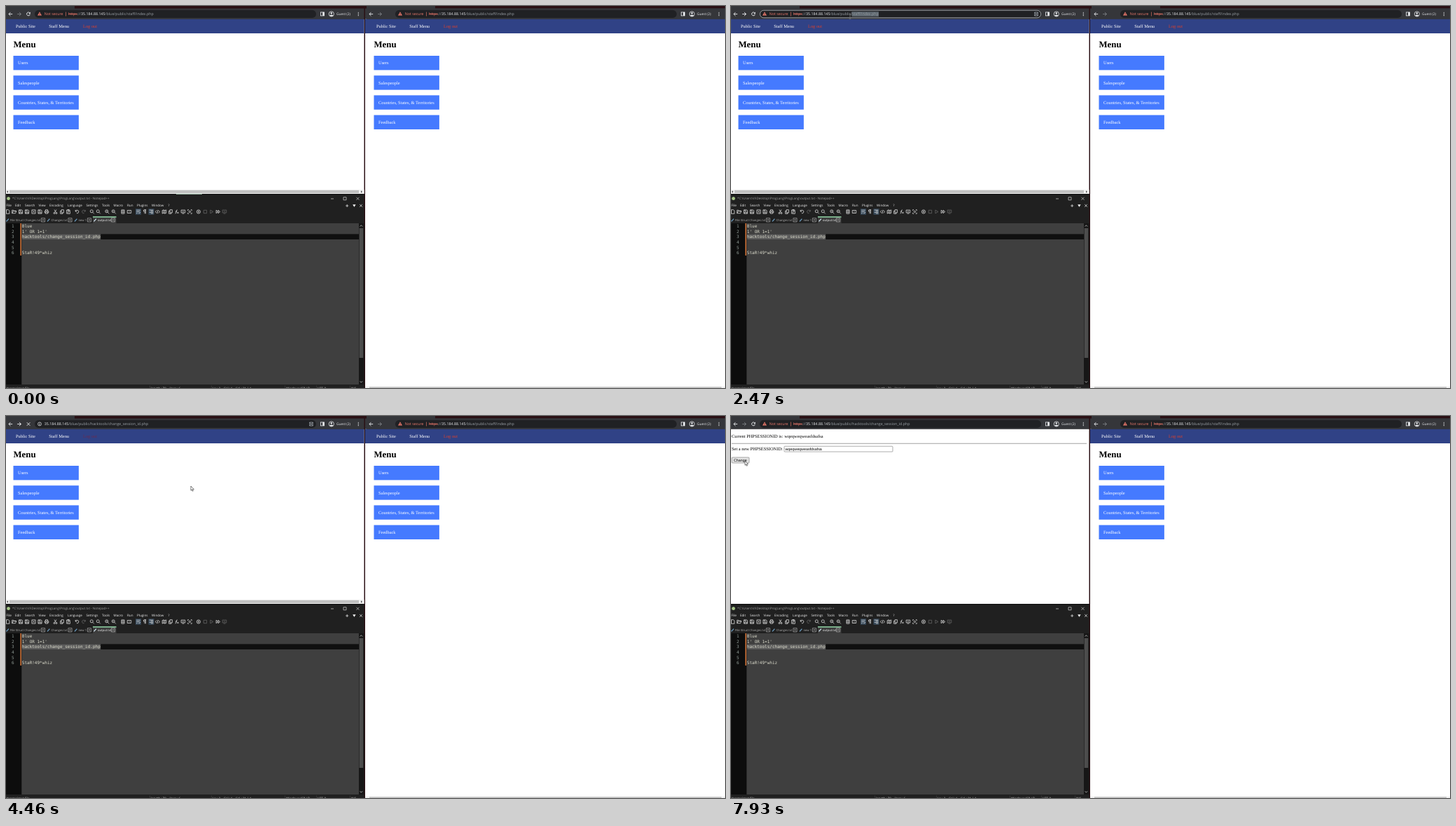
Recreate the animation shown at these times as an HTML page. Size 1027 px wide and 545 px high, loop 8 s.

```html
<!DOCTYPE html>
<html lang="en">
<head>
<meta charset="utf-8">
<title>Session change</title>
<style>
  html, body { margin: 0; width: 100%; height: 100%; overflow: hidden; background: #2a1014; }
  svg { display: block; width: 1027px; height: 545px; }
  text { white-space: pre; text-rendering: geometricPrecision; }
  .ui { font-family: "Open Sans", "Noto Sans", sans-serif; }
  .serif { font-family: "Liberation Serif", serif; }
  .sans { font-family: "Liberation Sans", sans-serif; }
  .mono { font-family: "DejaVu Sans Mono", monospace; }
</style>
</head>
<body>
<svg id="stage" viewBox="0 0 1027 545"></svg>
<script>
const LOOP = 8000;
const stage = document.getElementById('stage');

function el(parent, tag, attrs = {}) {
  const node = document.createElementNS('http://www.w3.org/2000/svg', tag);
  for (const key in attrs) node.setAttribute(key, attrs[key]);
  return parent.appendChild(node);
}
const group = (parent, x = 0, y = 0) => el(parent, 'g', { transform: `translate(${x} ${y})` });
const rect = (p, x, y, width, height, fill, more) => el(p, 'rect', { x, y, width, height, fill, ...more });
const circle = (p, cx, cy, r, fill, more) => el(p, 'circle', { cx, cy, r, fill, ...more });
const line = (p, d, stroke, width = 0.8, more) =>
  el(p, 'path', { d, stroke, 'stroke-width': width, fill: 'none', ...more });

// content is a string or a list of [string, colour, extra attributes]
function label(p, x, midY, content, size, fill, font = 'ui', more) {
  const node = el(p, 'text', { x, y: midY + size * 0.34, 'font-size': size, fill, class: font, ...more });
  if (typeof content === 'string') node.textContent = content;
  else for (const [str, color, extra] of content)
    el(node, 'tspan', { fill: color, ...extra }).textContent = str;
  return node;
}

// groups shown only during [from, to)
const timed = [];
function during(parent, from, to) {
  const g = group(parent);
  timed.push([g, from, to]);
  return g;
}

const BAR = '#35363a', FIELD = '#202124', PALE = '#e8eaed', DIM = '#9aa0a6', WARN = '#ee7a6c';
const HOST = '35.184.88.145';
const HACK = '/blue/public/hacktools/change_session_id.php';
const URL_SIZE = 5.31, BODY = 6.42, FORM = 5.35;
const T = { focus: 1220, press: 1290, release: 1840, paste: 2940, enter: 4090, load: 4600, pick: 5630, type: 6300, submit: 7790, done: 7880 };

/* ---------- browser ---------- */
function insecureUrl(g, path) {
  el(g, 'path', { d: 'M48 8.2l3 5.4h-6z', fill: WARN });
  rect(g, 47.7, 10, 0.7, 1.8, FIELD);
  rect(g, 47.7, 12.3, 0.7, 0.7, FIELD);
  label(g, 54.8, 11.5, 'Not secure', URL_SIZE, WARN);
  rect(g, 85.2, 8.5, 0.6, 6, WARN);
  label(g, 89, 11.5, [['https', WARN, { 'text-decoration': 'line-through' }], ['://', DIM], [HOST, PALE], [path, DIM]], URL_SIZE, DIM);
}
const backArrow = 'M9.2 11.5h-5.2M6.5 8.9l-2.6 2.6l2.6 2.6';
const forwardArrow = 'M16.2 11.5h5.2M18.9 8.9l2.6 2.6l-2.6 2.6';
function reloadIcon(g) {
  line(g, 'M34.3 12a2.4 2.4 0 1 1-.6-2.3', PALE, 0.9);
  el(g, 'path', { d: 'M34.8 8.6v2.6h-2.6z', fill: PALE });
}
const stopIcon = g => line(g, 'M29.8 9.2l4.6 4.6M34.4 9.2l-4.6 4.6', PALE, 0.9);

function browserBar(g, width) {
  rect(g, 0, 0, 98, 4, BAR);
  rect(g, 0, 3.5, width, 15.5, BAR);
  line(g, backArrow, PALE, 0.9);
  line(g, forwardArrow, '#7d8084', 0.9);
  rect(g, 41, 5.8, 402, 11.2, FIELD, { rx: 5.6 });
  rect(g, 449.5, 8.9, 5, 5, 'none', { stroke: PALE, 'stroke-width': 0.8 });
  rect(g, 452.2, 8.9, 2.4, 5, PALE);
  circle(g, 464.8, 11.4, 3.6, 'none', { stroke: PALE, 'stroke-width': 0.8 });
  circle(g, 464.8, 10.2, 1.2, PALE);
  el(g, 'path', { d: 'M462.3 13.6q2.5-2.4 5 0q-2.5 2.4-5 0z', fill: PALE });
  label(g, 472, 11.5, 'Guest (2)', 4.8, PALE, 'ui', { 'font-weight': 500 });
  for (const y of [9.3, 11.4, 13.5]) circle(g, 503.3, y, 0.65, PALE);
}

function menuPage(g, width, height) {
  rect(g, 0, 19, width, height - 19, '#fff');
  rect(g, 0, 18.8, width, 20.2, '#304286');
  label(g, 14, 29.3, 'Public Site', BODY, '#fff', 'serif');
  label(g, 61.2, 29.3, 'Staff Menu', BODY, '#fff', 'serif');
  const logout = label(g, 110, 29.3, 'Log out', BODY, '#d8402f', 'serif');
  label(g, 10.5, 55, 'Menu', 12.84, '#000', 'serif', { 'font-weight': 700 });
  ['Users', 'Salespeople', 'Countries, States, & Territories', 'Feedback'].forEach((name, i) => {
    const y = 71 + i * 28.2;
    rect(g, 10.5, y, 93.4, 20.4, '#457aff');
    label(g, 17, y + 10.3, name, BODY, '#fff', 'serif');
  });
  return logout;
}

const right = group(stage, 515);
const rightBase = group(right, -2);
rect(rightBase, 0, 3.5, 514, 16, BAR);
rect(rightBase, 0, 18.8, 514, 527, '#fff');
rect(rightBase, 0, 18.8, 514, 20.2, '#304286');
browserBar(right, 512);
menuPage(right, 512, 545);
insecureUrl(right, '/blue/public/staff/index.php');
rect(right, -2, 542.8, 514, 3, '#f1f1f1');
rect(right, 4, 543.4, 503, 2, '#c1c1c1');

const left = group(stage);
browserBar(left, 511.5);
const menu = during(left, 0, T.load);
const logout = menuPage(menu, 511.5, 268);
rect(menu, 0, 262, 511.5, 6, '#f1f1f1');
rect(menu, 5, 262.8, 499, 4.2, '#c1c1c1');
el(menu, 'path', { d: 'M3 263.2v3.6l-2-1.8zM507 263.2v3.6l2-1.8z', fill: '#505050' });
line(during(left, T.press, T.load), forwardArrow, PALE, 0.9);
[[0, T.enter], [T.load, T.submit], [T.done, LOOP]].forEach(([a, b]) => reloadIcon(during(left, a, b)));
[[T.enter, T.load], [T.submit, T.done]].forEach(([a, b]) => stopIcon(during(left, a, b)));

const focused = during(left, T.focus, T.paste);
rect(focused, 41.4, 6.2, 401.2, 10.6, FIELD, { rx: 5.3, stroke: '#a9adb2', 'stroke-width': 0.9 });
const urlPick = rect(focused, 211, 8, 0, 7.2, '#5b646c');
insecureUrl(during(left, 0, T.paste), '/blue/public/staff/index.php');

const keyIcon = g => line(g, 'M433.8 9h4.4v5h-4.4zM433 9l6 5M439 9l-6 5', DIM, 0.8);
keyIcon(focused);
const loading = during(left, T.enter, T.load);
keyIcon(loading);
circle(loading, 48, 11.4, 2.5, 'none', { stroke: PALE, 'stroke-width': 0.7 });
rect(loading, 47.6, 11, 0.8, 2, PALE);
rect(loading, 47.6, 9.7, 0.8, 0.8, PALE);
label(loading, 54.8, 11.5, [[HOST, PALE], [HACK, DIM]], URL_SIZE, DIM);
insecureUrl(during(left, T.load, LOOP), HACK);

/* ---------- session form ---------- */
const form = during(left, T.load, LOOP);
const OLD_ID = 'aasdfasdfasdfasdfasfasdfasdfasdf', NEW_ID = 'wqeqweqweasfdsafsa';
rect(form, 0, 18.8, 511.5, 249.2, '#fff');
label(form, 1, 29, 'Current PHPSESSIONID is: ', BODY, '#000', 'serif');
const currentId = label(form, 76.2, 29, OLD_ID, BODY, '#000', 'serif');
rect(form, 1, 38.8, 507, 0.8, '#8a8a8a');
label(form, 1, 47, 'Set a new PHPSESSIONID:', BODY, '#000', 'serif');
const field = rect(form, 76, 43.2, 155, 7.8, '#fff', { rx: 0.8 });
const idPick = rect(form, 77.5, 44, 0, 6.2, '#3367d1');
const fieldText = label(form, 77.5, 47.1, OLD_ID, FORM, '#000', 'sans');
const caret = rect(form, 77.5, 44.2, 0.5, 5.8, '#000');
const button = rect(form, 1.2, 59, 24.8, 8, '#efefef', { rx: 1, stroke: '#767676', 'stroke-width': 0.6 });
label(form, 4, 62.9, 'Change', FORM, '#000', 'sans');

/* ---------- address suggestions ---------- */
const drop = during(left, T.paste, T.enter);
rect(drop, 38.5, 4, 407.5, 49.5, '#000', { rx: 3.5, opacity: 0.25 });
rect(drop, 39, 3.6, 406, 48.4, FIELD, { rx: 3.2 });
rect(drop, 39, 18.8, 406, 15.2, '#3a3c40');
for (const y of [11.4, 26.4]) {
  circle(drop, 48, y, 2.5, '#a5b0bb');
  line(drop, `M46 ${y - 1}h2l1 1.4l-1.2 1.6M49.2 ${y - 2}l.8 1.6`, '#3c4650', 0.7);
}
line(drop, 'M45.6 41a1.6 1.6 0 1 0 3.2 0a1.6 1.6 0 1 0-3.2 0M48.5 42.2l2 2', PALE, 0.8);
label(drop, 59, 11.5, [['https://', DIM], [HOST, PALE], [HACK, DIM]], URL_SIZE, DIM);
rect(drop, 227, 8.3, 0.5, 6.4, PALE);
label(drop, 59, 26.5, 'https://' + HOST + HACK, URL_SIZE, '#8ab4f8', 'ui', { 'font-weight': 700 });
label(drop, 59, 42, [['https://' + HOST + HACK, PALE], [' - Quelmo Search', DIM]], URL_SIZE, PALE);

/* ---------- editor ---------- */
const pad = group(stage);
rect(pad, 0, 268, 511.5, 277, '#202020');
rect(pad, 0, 268, 511.5, 1.2, '#0f0f10');
rect(during(pad, 0, 130), 243, 267.8, 37, 1, '#a9c7b4');
circle(pad, 3.5, 274.7, 2.4, '#a8c98a');
label(pad, 9, 274.8, '*C:\\Users\\Vi\\Desktop\\ProgLang\\ProgLang\\output.txt - Notepad++', 4.55, '#a0a0a0');
line(pad, 'M464 275h4M482 272.8h4v4h-4zM500.5 272.8l4 4M504.5 272.8l-4 4', '#d0d0d0', 0.7);

const menus = { File: 0.5, Edit: 13, Search: 27, View: 46.5, Encoding: 62, Language: 88, Settings: 114.5, Tools: 137,
  Macro: 153.5, Run: 173, Plugins: 187, Window: 208, '?': 231.5 };
for (const name in menus) label(pad, menus[name], 284.9, name, 4.6, '#f0f0f0');
line(pad, 'M485.2 285h4M487.2 283v4M505.2 283l3.6 3.6M508.8 283l-3.6 3.6', '#e0e0e0', 0.8);
el(pad, 'path', { d: 'M495.2 283.3h4.4l-2.2 3.4z', fill: '#fff' });

const glyphs = {
  page: 'M-2-2.8h3l1.4 1.4v4.2h-4.4z',
  open: 'M-2.8 2.2v-4.4h2l1 1h2.4v1M-2.8 2.2l1.3-3h4.8l-1.3 3z',
  save: 'M-2.6-2.6h4.2l1 1v4.2h-5.2zM-1.3 2.6v-2h2.6v2M-1.2-2.6v1.4h2',
  close: 'M-2.6-2.6h5.2v5.2h-5.2zM-1.2-1.2l2.4 2.4M1.2-1.2l-2.4 2.4',
  print: 'M-1.6-.8v-2h3.2v2M-1.6 1.4h-1.2v-2.2h5.6v2.2h-1.2M-1.6 .6h3.2v2h-3.2z',
  cut: 'M-1.5-3l2.5 4M1.5-3l-2.5 4M-2.5 2a1 1 0 1 0 2 0a1 1 0 1 0-2 0M.5 2a1 1 0 1 0 2 0a1 1 0 1 0-2 0',
  copy: 'M-.9-2.8h3.3v4.2h-3.3zM-.9-1.2h-1.4v4h3.3v-1.4',
  paste: 'M-1-2.4h-1.4v5h1.6M-1-3h2v1.2h-2zM1-2.4h1.2v1.4M-.4-.6h2.8v3.4h-2.8z',
  undo: 'M-2.3-2.6v2.2h2.2M-2.2-.5a2.3 2.3 0 1 1 1.6 2.7',
  redo: 'M2.3-2.6v2.2h-2.2M2.2-.5a2.3 2.3 0 1 0-1.6 2.7',
  find: 'M-2.7-.7a2 2 0 1 0 4 0a2 2 0 1 0-4 0M.8 .8l2 2',
  zoom: 'M-2.7-.7a2 2 0 1 0 4 0a2 2 0 1 0-4 0M.8 .8l2 2M-1.6-.7h1.8',
  sync: 'M-2-2.7h4v5.4h-4zM-2-1h4M-2 1h4',
  pane: 'M-2.7-2h5.4v4h-5.4zM0-.8v1.6',
  wrap: 'M-2.8-2.2h5.6M-2.8 0h4.6q1.6 1.2 0 2.2h-1.6M-2.8 2.2h1.6',
  para: 'M2.2-2.8h-2.4a1.4 1.4 0 0 0 0 2.8M0-2.8v5.6M1.5-2.8v5.6',
  indent: 'M-2.8-2.4h5.6M-.6-.8h3.4M-2.8 .8h5.6M-.6 2.4h3.4',
  code: 'M-1.4-2l-1.6 2l1.6 2M1.4-2l1.6 2l-1.6 2M.6-2.6l-1.2 5.2',
  map: 'M-2.8-1.8l1.9-.8l1.8 .8l1.9-.8v4.4l-1.9 .8l-1.8-.8l-1.9 .8zM-.9-2.6v4.4M.9-1.8v4.4',
  func: 'M-2.4 2.6q1.3 .2 1.5-2.6q.2-3 1.8-2.6M-2-.4h2.2M.4 .4l2.2 2.2M2.6 .4l-2.2 2.2',
  screen: 'M-2.8-2.4h5.6v3.8h-5.6zM-1.4 2.6h2.8M-1.2-.5h2.4',
  eye: 'M-2.8-1.4v-1.4h1.4M1.4-2.8h1.4v1.4M2.8 1.4v1.4h-1.4M-1.4 2.8h-1.4v-1.4M-1.2 0a1.2 1.2 0 1 0 2.4 0a1.2 1.2 0 1 0-2.4 0',
  record: 'M-2.6 0a2.6 2.6 0 1 0 5.2 0a2.6 2.6 0 1 0-5.2 0M-.9 0a.9 .9 0 1 0 1.8 0a.9 .9 0 1 0-1.8 0',
  stop: 'M-2.2-2.2h4.4v4.4h-4.4z',
  play: 'M-1.6-2.4l4 2.4l-4 2.4z',
  fast: 'M-2.8-2.2l2.8 2.2l-2.8 2.2zM0-2.2l2.8 2.2l-2.8 2.2z'
};
const tools = 'page:2.5 open:11.5 save:21 save:30 close:39.5 save:48.5 print:58 cut:70.5 copy:80 paste:89 undo:101.5 redo:111 ' +
  'find:123 find:132 zoom:144.5 zoom:154 sync:167 pane:176 wrap:189 para:198 indent:207.5 code:216.5 map:226 copy:235 ' +
  'func:244 screen:253 eye:262.5 record:275 stop:284.5 play:293.5 fast:303 screen:312';
for (const item of tools.split(' ')) {
  const [name, x] = item.split(':');
  if (name === 'wrap' || name === 'indent') rect(pad, x - 4, 289.3, 8, 8.4, '#37495a');
  const off = ['redo', 'stop', 'play'].includes(name) || x === '312';
  line(group(pad, x, 293.5), glyphs[name], off ? '#686868' : '#e6e6e6', 0.75);
}

rect(pad, 124, 300.4, 33.5, 9.6, '#3c3c3c');
rect(pad, 124, 300.2, 33.5, 1.5, '#8fd3a4');
for (const [name, x, closeX] of [['File Struct Changes.txt', 6, 53], ['Changes.txt', 64.5, 91.5], ['new 1', 103.5, 119], ['output.txt', 131, 153]]) {
  label(pad, x, 305.4, name, 4.2, closeX === 153 ? '#fff' : '#b4b4b4');
  line(group(pad, closeX, 305.3), glyphs.close, '#c4c4c4', 0.6);
  line(pad, `M${x - 5.5} 307.4l3.4-3.8`, closeX === 153 ? '#d6e8f5' : '#6d9fc4', 1.3);
}

rect(pad, 0, 310, 22, 230, '#0d0d0d');
rect(pad, 22.5, 310, 482, 230, '#3f3f3f');
rect(pad, 22.5, 325.4, 481.5, 7.6, '#101010');
rect(pad, 22.8, 325.4, 112.4, 7.6, '#5c5c5c');
rect(pad, 20.4, 310, 1.5, 46, '#d9773a');
['Blue', "1' OR 1=1'", 'hacktools/change_session_id.php', '', '', 'StaR!49*whiz'].forEach((str, i) => {
  const y = 314.2 + i * 7.62;
  label(pad, 8, y, String(i + 1), 6, '#8f9a95', 'mono');
  label(pad, 22.8, y, str, 6.01, '#dcdccc', 'mono');
});
rect(pad, 504, 310, 7.5, 230, '#171717');
rect(pad, 504.6, 317, 5.6, 185, '#4d4d4d');
line(pad, 'M505.7 314.6l1.7-1.9l1.7 1.9M505.7 535.3l1.7 1.9l1.7-1.9', '#c0c0c0', 0.8);
rect(pad, 0, 540, 511.5, 5, '#202020');
[['Normal text file', 1], ['length : 78    lines : 6', 207], ['Ln : 3    Col : 1    Sel : 31 | 1', 295], ['Windows (CR LF)', 400], ['UTF-8', 445], ['INS', 493]]
  .forEach(([str, x]) => {
    label(pad, x, 545.4, str, 4.5, '#d8d8d8');
    if (x > 1) rect(pad, x - 2, 541.5, 0.4, 4, '#555');
  });

/* ---------- pointer ---------- */
const pointer = group(stage);
const halo = circle(pointer, 0.8, 0.6, 4.6, '#d8cc10', { opacity: 0.75 });
const arrow = el(pointer, 'path', { d: 'M0 0v6.2l1.4-1.2l1 2.2l1-.4l-1-2.2h2z', fill: '#fff', stroke: '#222', 'stroke-width': 0.6 });
const beam = line(pointer, 'M-1.4-3.2h1h.4h1.4M0-3.2v6.4M-1.4 3.2h2.8', '#777', 0.8);
const track = [
  [130, 905, 480], [330, 640, 365], [470, 574, 318], [820, 400, 150], [1220, 211, 12], [1290, 211, 12],
  [1630, 165, 13], [1840, 172.5, 13], [2260, 172.5, 13], [2470, 170, 15], [2940, 170, 15], [3080, 245, 21],
  [3700, 250, 27], [4050, 250, 27], [4260, 264, 100], [4880, 264, 100], [5290, 180, 52], [5560, 159, 47],
  [5630, 158, 47], [5770, 84, 46], [5910, 76, 45], [6120, 49, 43], [6260, 49, 43], [6750, 98, 69],
  [7100, 98, 70], [7580, 20, 64], [LOOP, 20, 64]
];
function pointerAt(t) {
  const i = track.findIndex(k => k[0] > t);
  if (i < 1) return [track[0][1], track[0][2]];
  const [t0, x0, y0] = track[i - 1], [t1, x1, y1] = track[i];
  const k = (t - t0) / (t1 - t0);
  return [x0 + (x1 - x0) * k, y0 + (y1 - y0) * k];
}

const show = (node, on) => node.setAttribute('visibility', on ? 'inherit' : 'hidden');
const within = (t, a, b) => t >= a && t < b;
const set = (node, attrs) => { for (const key in attrs) node.setAttribute(key, attrs[key]); };
const write = (node, str) => { if (node.textContent !== str) node.textContent = str; };

function render(t) {
  for (const [g, from, to] of timed) show(g, within(t, from, to));
  const [x, y] = pointerAt(t);
  const text = within(t, T.focus - 70, T.paste) || within(t, 5520, 5910);
  const pressed = within(t, T.press, T.release) || within(t, T.pick, 6120) || within(t, T.submit - 70, T.submit + 70);
  set(pointer, { transform: `translate(${x.toFixed(2)} ${y.toFixed(2)})` });
  show(pointer, t >= 130);
  show(arrow, !text);
  show(beam, text);
  show(halo, pressed);
  set(logout, { fill: t < T.enter ? '#d8402f' : '#6a2b50' });

  const from = t < T.press ? 211 : t < T.release ? x : 172.5;
  set(urlPick, { x: from, width: 211 - from });

  const count = Math.max(0, Math.min(NEW_ID.length, Math.floor((t - T.type) / 50)));
  const picking = within(t, T.pick, T.type);
  const focus = within(t, T.pick, T.done);
  const start = Math.max(77.5, Math.min(158.4, x));
  set(idPick, picking ? { x: start, width: 158.4 - start } : { width: 0 });
  set(field, { stroke: focus ? '#101010' : '#767676', 'stroke-width': focus ? 1.2 : 0.6 });
  write(fieldText, t < T.type ? OLD_ID : NEW_ID.slice(0, count));
  set(fieldText, { fill: within(t, 5770, T.type) ? '#fff' : '#000' });
  const typing = within(t, T.type, T.submit);
  show(caret, typing);
  if (typing) set(caret, { x: 77.6 + (count ? fieldText.getComputedTextLength() : 0) });
  write(currentId, t < T.done ? OLD_ID : NEW_ID);
  set(button, { fill: t > 7560 ? '#e3e3e3' : '#efefef' });
}

const began = performance.now();
function tick() {
  render((performance.now() - began) % LOOP);
  requestAnimationFrame(tick);
}
tick();
</script>
</body>
</html>
```
